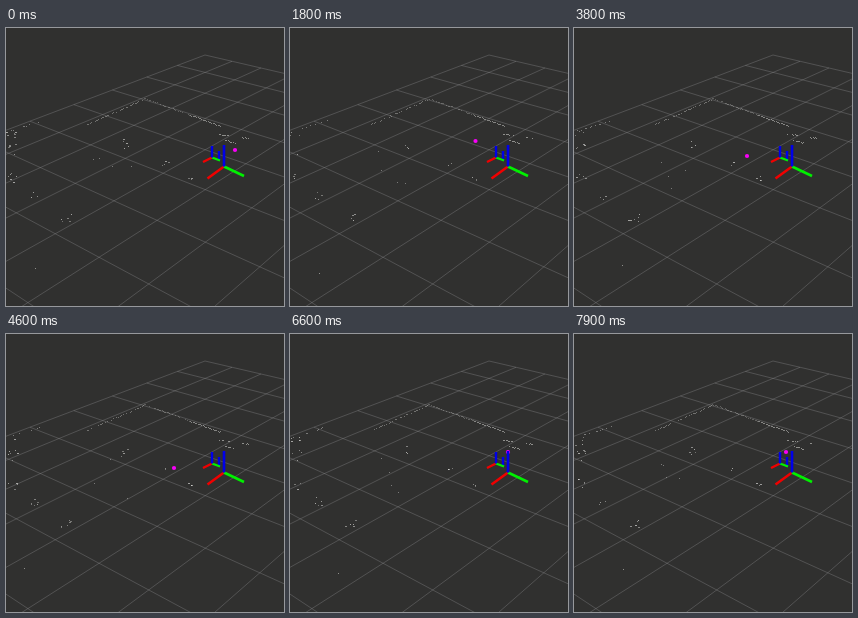
An HTML page with a canvas that plays this animation: 278 px wide and 278 px high, repeating every 8 s.

```html
<!DOCTYPE html>
<html lang="en">
<head>
<meta charset="utf-8">
<title>Laser scan view</title>
<style>
  html, body { margin: 0; width: 100%; height: 100%; overflow: hidden; background: #30302f; }
  canvas { display: block; width: 278px; height: 278px; }
</style>
</head>
<body>
<canvas id="view" width="278" height="278"></canvas>
<script>
const SIZE = 278, LOOP = 8000, TICK = 100;
const ctx = document.getElementById('view').getContext('2d');

// Ground plane: far corner, two vanishing points and the depth per cell
const corner = [199, 27], vpX = [720, -170], vpY = [-650, -170];
const stepX = 0.0503, stepY = 0.0309;

function project(i, j) {
  const a = -i * stepX, b = -j * stepY, w = 1 + a + b;
  return [0, 1].map(k => (corner[k] + vpX[k] * a + vpY[k] * b) / w);
}

function line(x1, y1, x2, y2, color, width) {
  ctx.strokeStyle = color;
  ctx.lineWidth = width;
  ctx.beginPath();
  ctx.moveTo(x1, y1);
  ctx.lineTo(x2, y2);
  ctx.stroke();
}

// Extends a line from a through b well beyond the stage
function ray([ax, ay], [bx, by]) {
  const k = 900 / Math.hypot(bx - ax, by - ay);
  line(ax, ay, ax + (bx - ax) * k, ay + (by - ay) * k, 'rgba(160,160,164,.4)', 0.75);
}

function drawGrid() {
  for (let n = 0; n < 10; n++) {
    ray(project(n, 0), project(n, 0.5));
    ray(project(0, n), project(0.5, n));
  }
}

// One coordinate frame: origin, then the offsets of its red, green and blue arms
function frame(x, y, red, green, up, width) {
  line(x, y, x + red[0], y + red[1], '#f00000', width);
  line(x, y, x + green[0], y + green[1], '#00f000', width);
  line(x, y, x, y - up, '#0000e8', width);
}

function drawAxes() {
  line(213, 133, 213, 123, '#0000e8', 2.4);
  frame(206, 129.5, [-9, 4.5], [8, 3], 11.5, 2.4);
  frame(218, 138.5, [-16.5, 12], [20, 9.5], 21.5, 2.6);
}

function randomizer(seed) {
  let s = Math.imul(seed + 1, 2654435761) >>> 0;
  return () => {
    s = (s + 0x6D2B79F5) >>> 0;
    let r = Math.imul(s ^ (s >>> 15), s | 1);
    r ^= r + Math.imul(r ^ (r >>> 7), r | 61);
    return ((r ^ (r >>> 14)) >>> 0) / 4294967296;
  };
}

function speck(x, y, alpha, w = 1) {
  ctx.fillStyle = `rgba(235,235,232,${alpha})`;
  ctx.fillRect(Math.round(x), Math.round(y), w, 1);
}

// Dotted surface between two points
function wall(rnd, [x1, y1], [x2, y2], seen, alpha) {
  const n = Math.abs(x2 - x1) * 0.8;
  for (let k = 0; k <= n; k++) {
    const p = k / n, dy = (rnd() - 0.5) * 0.8;
    if (rnd() < seen) speck(x1 + (x2 - x1) * p, y1 + (y2 - y1) * p + dy, alpha);
  }
}

// Places where returns keep gathering
const clusters = [[116, 116], [159, 136], [184, 150], [60, 190], [28, 166], [7, 149], [7, 121], [4, 107]];

function drawScan(tick) {
  const rnd = randomizer(tick * 37 + 5);
  wall(rnd, [81, 96], [138, 71], 0.6, 0.35);
  wall(rnd, [138, 70], [184, 87], 0.7, 0.26);
  wall(rnd, [184, 87], [215, 98], 1, 0.45);
  wall(rnd, [213, 106], [223, 107], 0.7, 0.5);
  wall(rnd, [219, 112], [230, 115], 0.9, 0.5);
  wall(rnd, [236, 109], [243, 110], 0.7, 0.5);
  wall(rnd, [2, 103], [38, 92], 0.25, 0.4);

  clusters.forEach(([x, y], c) => {
    const fixed = randomizer(c + 400), r = x > 140 ? 2.5 : 5.5;
    for (let k = 0; k < r + 1; k++) {
      const px = x + (fixed() * 2 - 1) * r + (rnd() - 0.5) * 1.6;
      const py = y + (fixed() * 2 - 1) * r + (rnd() - 0.5) * 1.6;
      if (rnd() < 0.65) speck(px, py, 0.35 + rnd() * 0.3, rnd() < 0.35 ? 2 : 1);
    }
  });

  // Stray returns in the middle of the floor and near the camera
  for (let k = 0; k < 4; k++) speck(85 + rnd() * 40, 120 + rnd() * 45, 0.4);
  speck(17 + rnd() * 40, 227 + rnd() * 20, 0.5);
}

// Marker path: tick, x, y
const track = [[0, 229, 122], [18, 185.5, 113], [46, 168, 134], [58, 201, 110], [66, 218, 118], [79, 212, 118]];

function drawMarker(tick) {
  if (tick > 24 && tick < 31) return; // out of the scanner's sight
  const n = Math.max(1, track.findIndex(p => p[0] >= tick));
  const [t0, x0, y0] = track[n - 1], [t1, x1, y1] = track[n];
  const p = (tick - t0) / (t1 - t0);
  ctx.fillStyle = '#f800f8';
  ctx.beginPath();
  ctx.arc(x0 + (x1 - x0) * p, y0 + (y1 - y0) * p, 2.1, 0, Math.PI * 2);
  ctx.fill();
}

// Scans arrive every tick, or every other one in the slow stretches
function scanTick(time) {
  const tick = Math.floor(time / TICK);
  const slow = tick < 15 || (tick > 21 && tick < 27) || (tick > 29 && tick < 35);
  return slow && tick % 2 === 0 ? Math.max(0, tick - 1) : tick;
}

function draw(now) {
  const tick = scanTick(now % LOOP);
  ctx.fillStyle = '#30302f';
  ctx.fillRect(0, 0, SIZE, SIZE);
  drawGrid();
  drawScan(tick);
  drawMarker(tick);
  drawAxes();
  requestAnimationFrame(draw);
}

draw(0);
</script>
</body>
</html>
```
